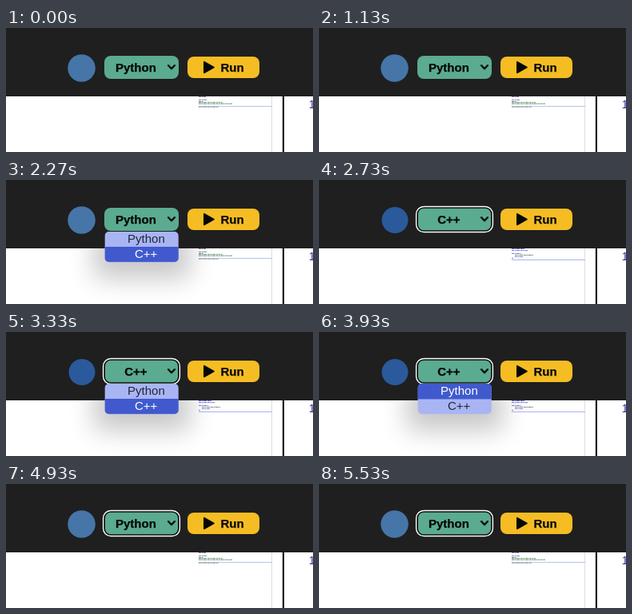
An HTML page that plays this animation: 384x156 px, repeating every 5.59 s.

```html
<!DOCTYPE html>
<html lang="en">
<head>
<meta charset="utf-8">
<title>Language picker</title>
<style>
  html, body { margin: 0; width: 100%; height: 100%; overflow: hidden; background: #fff; }
  svg { display: block; width: 384px; height: 156px; }
  text { font-family: "Liberation Sans", Arial, sans-serif; font-size: 15px; text-anchor: middle; }
  .bold { font-weight: 700; fill: #050807; stroke: #050807; stroke-width: .25px; }
</style>
</head>
<body>
<svg viewBox="0 0 384 156">
  <defs>
    <filter id="blur" x="-60%" y="-120%" width="220%" height="340%">
      <feGaussianBlur stdDeviation="16"/>
    </filter>
    <clipPath id="page"><rect y="86" width="384" height="70"/></clipPath>
    <clipPath id="menuShape"><rect x="123.7" y="65" width="92" height="38.3" rx="5"/></clipPath>
  </defs>

  <rect width="384" height="156" fill="#fff"/>
  <g id="shadow" clip-path="url(#page)">
    <rect x="110" y="66" width="120" height="58" rx="6" fill="#000" opacity=".22" filter="url(#blur)"/>
  </g>
  <path d="M332.5 86V156" stroke="#dcdce6"/>
  <g id="minimapPython"></g>
  <g id="minimapCpp"></g>
  <rect x="345.8" y="86" width="2.2" height="70" fill="#1f1f1f"/>
  <text x="382.6" y="101" style="font-size:14px" fill="#2f2fa0">1</text>

  <rect width="384" height="86" fill="#1f1f1f"/>
  <circle id="badge" cy="50.5"/>

  <rect x="123" y="35" width="93" height="29" rx="8" fill="#5bab90"/>
  <g id="ring" fill="none">
    <rect x="123" y="34.8" width="93" height="29.4" rx="8" stroke="#0c0f0e" stroke-width="2"/>
    <rect x="121.6" y="33.5" width="95.8" height="32" rx="9.5" stroke="#fff" stroke-width="1.4"/>
  </g>
  <text id="choice" class="bold" x="162.4" y="55"></text>
  <path d="M203 47.1l4 4.2 4-4.2" fill="none" stroke="#050807" stroke-width="2.2" stroke-linecap="round" stroke-linejoin="round"/>

  <rect x="227" y="36" width="90" height="27" rx="8" fill="#f5bd23"/>
  <path d="M248 42.8v13.4l11.8-6.7z" fill="#050807" stroke="#050807" stroke-width="2" stroke-linejoin="round"/>
  <text class="bold" x="283" y="55">Run</text>

  <g id="menu">
    <g clip-path="url(#menuShape)">
      <rect x="123" y="65" width="93" height="39" fill="#a9b5f3"/>
      <rect id="highlight" x="123" width="93" height="19.5" fill="#405ace"/>
    </g>
    <text id="optPython" x="175.4" y="79">Python</text>
    <text id="optCpp" x="175.2" y="97.6">C++</text>
  </g>
</svg>
<script>
const LOOP = 5590;
const OPENINGS = [
  { open: 1195, hover: 1600, close: 2325 },
  { open: 3195, hover: 3930, close: 4395 }
];
const TO_CPP = 2395, TO_PYTHON = 4525;
const $ = id => document.getElementById(id);
const show = (id, on) => $(id).setAttribute('display', on ? 'inline' : 'none');
const set = (id, attrs) => Object.entries(attrs).forEach(([k, v]) => $(id).setAttribute(k, v));

// Minimap rows: x, y, width, colour.
function drawMinimap(id, rows, cursorY, cursorColor) {
  const lines = rows.map(([x, y, w, color]) =>
    `<path d="M${x} ${y}h${w}" stroke="${color}" stroke-dasharray="3 .6 2 .5 4 .7"/>`);
  $(id).innerHTML = `<path d="M241 ${cursorY}H333" stroke="${cursorColor}"/>` + lines.join('');
}
drawMinimap('minimapPython', [
  [241, 86.5, 9, '#85858f'], [241, 90.5, 10, '#7c88c4'], [241, 92.5, 6, '#8a8a98'],
  [241, 93.7, 30, '#6f8a78'], [241, 95.3, 42, '#5f9a6c'], [241, 99.4, 25, '#9a9aa8']
], 98.5, '#b5c6e6');
drawMinimap('minimapCpp', [
  [241, 86.5, 16, '#6466cc'], [241, 88.7, 20, '#6a70de'], [241, 92.5, 12, '#7a80c2'],
  [245, 94.5, 23, '#84848e'], [245, 96.5, 10, '#8484b4'], [241, 98.5, 2, '#888']
], 100.5, '#a9b0f6');

function render(t) {
  const cpp = t >= TO_CPP && t < TO_PYTHON;
  const menu = OPENINGS.find(m => t >= m.open && t < m.close);
  const ring = (t >= TO_CPP && t < OPENINGS[1].close) || t >= TO_PYTHON;

  $('choice').textContent = cpp ? 'C++' : 'Python';
  set('badge', cpp ? { cx: 95, r: 16.5, fill: '#2a5a9b' } : { cx: 94.5, r: 17.3, fill: '#4675a8' });
  show('minimapPython', !cpp);
  show('minimapCpp', cpp);
  show('ring', ring);
  show('menu', menu);
  show('shadow', menu);
  if (menu) {
    const onCpp = cpp !== (t >= menu.hover);
    set('highlight', { y: onCpp ? 84 : 65 });
    set('optPython', { fill: onCpp ? '#23263a' : '#fff' });
    set('optCpp', { fill: onCpp ? '#fff' : '#23263a' });
  }
}

const start = performance.now();
function tick() {
  render((performance.now() - start) % LOOP);
  requestAnimationFrame(tick);
}
tick();
</script>
</body>
</html>
```
